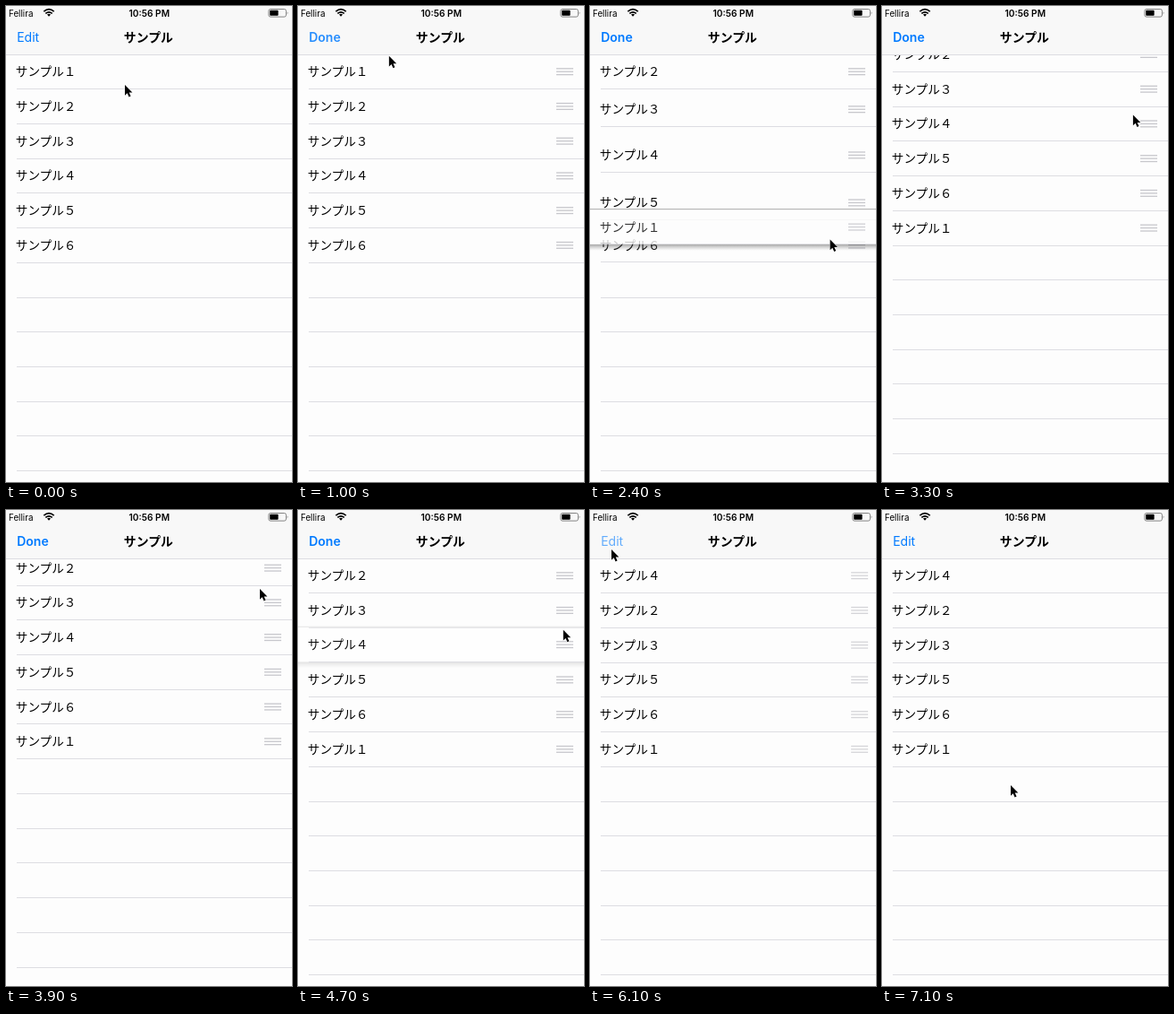
Recreate the animation shown at these times as an HTML page. Size 320 by 531 pixels, loop 7.5 s.

```html
<!DOCTYPE html>
<html lang="ja">
<head>
<meta charset="utf-8">
<style>
html, body { margin: 0; height: 100%; overflow: hidden; background: #fdfdfd; }
svg { display: block; width: 320px; height: 531px; font-family: Inter, "Noto Sans CJK JP", sans-serif; }
.jp { font: 13.6px "Noto Sans CJK JP", "Noto Sans CJK", sans-serif; }
.line { fill: #dddde2; shape-rendering: crispEdges; }
</style>
</head>
<body>
<svg viewBox="0 0 320 531">
  <defs>
    <linearGradient id="below" x2="0" y2="1">
      <stop stop-color="#444" stop-opacity=".6"/>
      <stop offset="1" stop-color="#888" stop-opacity="0"/>
    </linearGradient>
  </defs>
  <g id="list"></g>
  <rect width="320" height="54" fill="#f8f8f8"/>
  <rect class="line" y="54" width="320" height="1"/>
  <text x="3" y="11.5" font-size="9.8">Fellira</text>
  <text x="160.3" y="11.5" font-size="10.2" font-weight="600" text-anchor="middle">10:56 PM</text>
  <g fill="none" stroke="#000" stroke-width="1.7">
    <path d="M42.3 6.2Q48 1.2 53.7 6.2M44.3 8.4Q48 5.2 51.7 8.4"/>
    <path d="M46 9.5Q48 8 50 9.5L48 11.7Z" fill="#000" stroke="none"/>
    <rect x="293.9" y="3.5" width="19.5" height="8.6" rx="2" stroke="#777" stroke-width=".9"/>
    <rect x="295.2" y="4.8" width="9.4" height="6" rx=".8" fill="#000" stroke="none"/>
    <path d="M314.7 6.2Q316.3 7.8 314.7 9.4Z" fill="#777" stroke="none"/>
  </g>
  <text id="button" x="12.2" y="40" font-size="14" fill="#007aff"></text>
  <text class="jp" x="159.4" y="40" style="font-size:13.9px;font-weight:700" text-anchor="middle">サンプル</text>
  <path id="cursor" d="M0 0V11.8L2.7 9.3L4.6 13.5L6.6 12.6L4.7 8.5H8.4Z" stroke="#fff" stroke-width=".9" paint-order="stroke"/>
</svg>
<script>
const $ = id => document.getElementById(id);
const TOP = 53.8, H = 38.73;
const mix = (a, b, p) => a + (b - a) * p;
const slotY = s => TOP + H * (s + .5);
const ease = (t, start, span) => {
  const p = Math.min(1, Math.max(0, (t - start) / span));
  return p * p * (3 - 2 * p);
};

// Pointer moves: start time, duration, destination
const moves = [
  [0, 600, 24, 44], [750, 700, 291, 84], [2000, 500, 266, 281], [2800, 680, 284, 88],
  [4000, 500, 297, 136], [4650, 500, 290, 54], [5400, 600, 24, 44], [6200, 900, 144, 307]
];
function pointer(t) {
  let x = 133, y = 88;
  for (const [start, span, toX, toY] of moves) {
    const p = ease(t, start, span);
    x = mix(x, toX, p);
    y = mix(y, toY, p);
  }
  return [x, y];
}

// Dragged rows by index; grip is the row centre relative to the pointer
const drags = {
  0: { grab: 2000, drop: 2600, slot: 5, grip: -14 },
  3: { grab: 4650, drop: 5200, slot: 0, grip: 15 }
};

const line = y => `<rect class="line" x="12" y="${y}" width="308" height="1"/>`;
const bars = [-4, -.6, 2.8].map(y => `<rect x="289" y="${y}" width="19" height="1.3"/>`).join("");
let html = "";
for (let i = 6; i < 13; i++) html += line(TOP + H * (i + 1) - .4);
for (const n of "１２３４５６") html += `<g class="row">
  <g class="lift">
    <rect y="${-H / 2}" width="320" height="${H}" fill="#fdfdfd"/>
    <rect y="${-H / 2 - 1}" width="320" height="1" fill="#999"/>
    <rect y="${H / 2}" width="320" height="7" fill="url(#below)"/>
  </g>
  <text class="jp" x="10.8" y="5">サンプル${n}</text>
  <g class="handle" fill="#c7c7cc">${bars}</g>
  ${line(H / 2 - .4)}</g>`;
$("list").innerHTML = html;
const rows = [...document.querySelectorAll(".row")];

// Rows make room one after another as a dragged row passes
function restSlot(i, t) {
  const drag = drags[i];
  if (drag && t >= drag.drop) return drag.slot;
  const up = i > 0 ? ease(t, 2000 + 77 * i, 300) : 0;
  const down = i === 1 || i === 2 ? ease(t, 4990 - 110 * i, 300) : 0;
  return i - up + down;
}

function draw(t) {
  const [x, y] = pointer(t);
  const edit = ease(t, 700, 300) - ease(t, 6000, 300);
  const editing = t >= 800 && t < 6100;
  const scroll = -26 * (ease(t, 2900, 600) - ease(t, 3500, 650));
  $("cursor").setAttribute("transform", `translate(${x} ${y})`);
  $("list").setAttribute("transform", `translate(0 ${scroll})`);
  $("button").textContent = editing ? "Done" : "Edit";
  $("button").setAttribute("font-weight", editing ? 600 : 400);
  $("button").setAttribute("opacity", t < 800 ? 1 : .6 + .4 * ease(t, editing ? 800 : 6100, 350));

  rows.forEach((row, i) => {
    const drag = drags[i];
    const lift = drag ? ease(t, drag.grab, 150) - ease(t, drag.drop, 200) : 0;
    const rest = slotY(restSlot(i, t));
    const rowY = drag ? mix(rest, y + drag.grip, lift) : rest;
    row.setAttribute("transform", `translate(0 ${rowY})`);
    row.setAttribute("opacity", 1 - .2 * lift);
    row.querySelector(".lift").setAttribute("opacity", lift);
    const handle = row.querySelector(".handle");
    handle.setAttribute("opacity", edit);
    handle.setAttribute("transform", `translate(${(1 - edit) * 12} 0)`);
  });
  // The lifted row stays on top
  const top = rows[t < 3500 ? 0 : 3];
  if ($("list").lastChild !== top) $("list").append(top);
}

function tick() {
  draw(Math.floor(performance.now() % 7500 / 100) * 100);
  requestAnimationFrame(tick);
}
tick();
</script>
</body>
</html>
```
